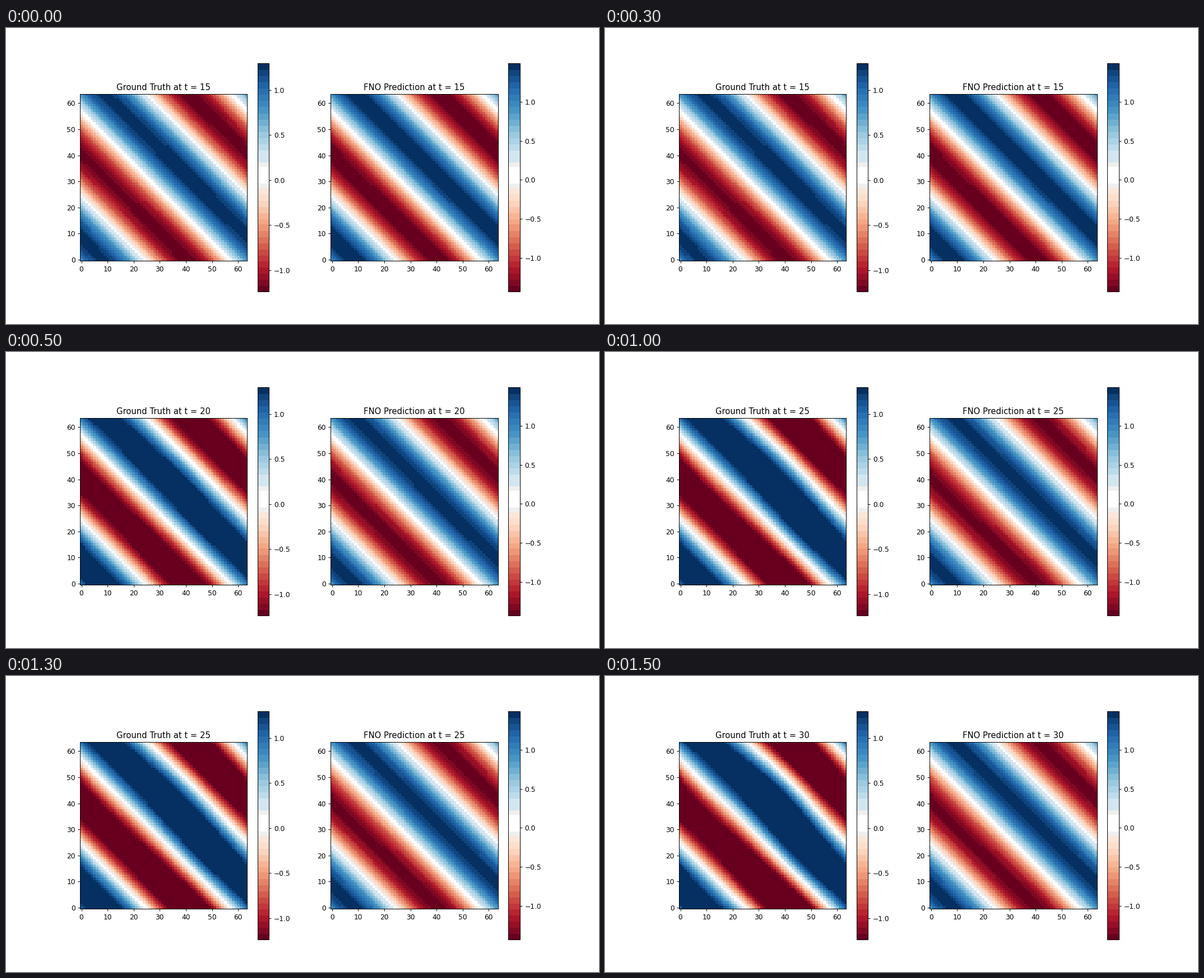
Recreate the animation shown at these times as a matplotlib script. Size 1058 by 529 pixels, loop 2 s.

```python
import numpy as np
import matplotlib.pyplot as plt
from matplotlib.animation import FuncAnimation
from matplotlib.colors import ListedColormap

N = 64
TIMES = [15, 20, 25, 30]
CENTRE = 8.4          # diagonal position of the blue crest, in cells
OFFSET = 0.03

# Amplitude, its variation along the crest and the bend in cells, per time
TRUTH_WAVE = [(1.26, 0.02, 0), (1.55, 0.05, 0.3),
              (1.68, 0.08, 1.0), (1.78, 0.11, 2.0)]
PREDICTION_WAVE = [(1.50, 0.01, 0), (1.46, 0.01, 0),
                   (1.45, 0.01, 0), (1.45, 0.01, 0)]

rows, cols = np.mgrid[:N, :N]


def banded_map():
    """RdBu reduced to flat bands with a white middle and full dark ends."""
    colors = plt.get_cmap("RdBu")(np.arange(256))
    low, high = colors[0].copy(), colors[-1].copy()
    edges = np.concatenate([np.linspace(0, 116, 18), [121, 140, 145],
                            np.linspace(158, 256, 15)]).astype(int)
    for start, stop in zip(edges[:-1], edges[1:]):
        colors[start:stop] = colors[start:stop].mean(axis=0)
    colors[:edges[1]] = low
    colors[edges[-2]:] = high
    colors[116:145, :3] = 0.937
    colors[121:140, :3] = 1.0
    return ListedColormap(colors)


def ripple(position, peak):
    return np.cos(2 * np.pi * (position - peak) / N)


def field(amplitude, variation, bend):
    shift = bend * (1 + ripple(cols, 40)) * (1 + ripple(rows, 48)) / 4
    along = 1 + variation * ripple(cols, 42)
    return OFFSET + amplitude * along * ripple(rows + cols - shift, CENTRE)


def add_panel(ax, wave, vmin, vmax):
    image = ax.imshow(field(*wave), cmap=cmap, origin="lower",
                      vmin=vmin, vmax=vmax)
    fig.colorbar(image, ax=ax)
    return image


plt.rcParams["font.family"] = "DejaVu Sans"
cmap = banded_map()
fig, axes = plt.subplots(1, 2, figsize=(12, 6), dpi=1058 / 12)
panels = [
    ("Ground Truth", TRUTH_WAVE,
     add_panel(axes[0], TRUTH_WAVE[0], -1.238, 1.2955)),
    ("FNO Prediction", PREDICTION_WAVE,
     add_panel(axes[1], PREDICTION_WAVE[0], -1.4338, 1.4964)),
]


def update(step):
    for ax, (name, waves, image) in zip(axes, panels):
        image.set_data(field(*waves[step]))
        ax.set_title(f"{name} at t = {TIMES[step]}")
    return [image for _, _, image in panels]


anim = FuncAnimation(fig, update, frames=len(TIMES), interval=500,
                     repeat=True, repeat_delay=0, blit=False)
plt.show()
```
